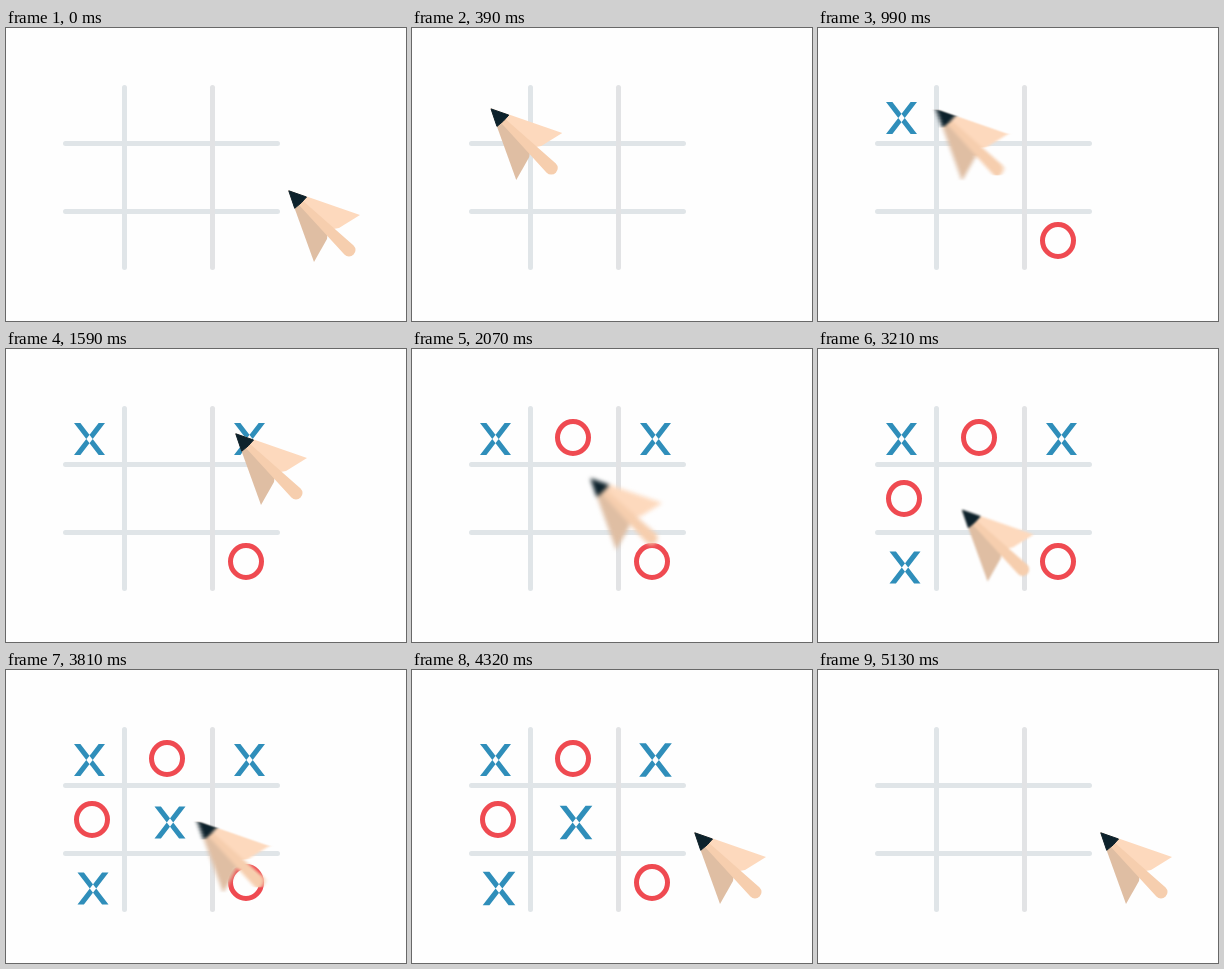
An HTML page for the animation above (5280 ms loop, 400 by 293 pixels).

```html
<!DOCTYPE html>
<html lang="en">
<head>
<meta charset="utf-8">
<title>Noughts and crosses</title>
<style>
html, body { margin: 0; width: 100%; height: 100%; overflow: hidden; background: #fefefe; }
svg { display: block; width: 100vw; height: 100vh; }
.grid { fill: none; stroke: #e0e5e8; stroke-width: 5; stroke-linecap: round; }
.x { fill: #2f8eba; }
.o { fill: none; stroke: #ef4a51; stroke-width: 5; }
</style>
</head>
<body>
<svg viewBox="0 0 400 293">
  <defs>
    <filter id="blur" x="-20%" y="-20%" width="140%" height="140%" color-interpolation-filters="sRGB">
      <feGaussianBlur stdDeviation="0"/>
    </filter>
    <path id="x" class="x" d="M-15.5-16h6.4L15.5 16H9.1zM15.5-16H9.1L-15.5 16h6.4z"/>
    <ellipse id="o" class="o" rx="15.5" ry="16"/>
  </defs>
  <path class="grid" d="M118.5 59.5V239.5M59.5 115.5H271.5M59.5 183.5H271.5"/>
  <path class="grid" style="stroke:#e2e3e5" d="M206.5 59.5V239.5"/>
  <g id="marks"></g>
  <g filter="url(#blur)">
    <g id="pencil">
      <path fill="#fdd9bd" d="M0 0L72 25 51 38 40 40z"/>
      <path fill="#dfbea3" d="M0 0L26 72 39 49 40 40z"/>
      <path fill="#f6ceae" d="M14.5 10.5L65.6 55.4A6.5 6.5 0 0 1 56.4 64.6L10.5 14.5z"/>
      <path fill="#0d222c" stroke="#0d222c" stroke-linejoin="round" d="M.8.8L18.5 7Q14 13 6.7 18.3z"/>
    </g>
  </g>
</svg>
<script>
const LOOP = 5280, HOME = [282, 162];

// start, end, x, y, end of the press that follows
const moves = [
  [0, 400, 78, 80, 700],
  [852, 1256, 229, 84, 1590],
  [1910, 2310, 83.5, 213, 2670],
  [2930, 3330, 159, 147, 3570],
  [3690, 4050, 286, 163],
  [4050, 4230, ...HOME]
];

// shape, x, y, fade start, fade end, part of the winning line
const marks = [
  ['x', 83.5, 90, 510, 630],
  ['o', 240, 212.5, 640, 850],
  ['x', 243.5, 90, 1380, 1500, true],
  ['o', 161, 88.5, 1650, 1910],
  ['x', 87, 218.5, 2435, 2600, true],
  ['o', 86, 149.5, 2820, 3000],
  ['x', 164, 152.5, 3420, 3560, true]
];

const $ = s => document.querySelector(s);
const ramp = (t, a, b) => Math.min(1, Math.max(0, (t - a) / (b - a)));
const ease = p => (1 - Math.cos(Math.PI * p)) / 2;

const layer = $('#marks'), pencil = $('#pencil'), blur = $('feGaussianBlur');
const nodes = marks.map(([shape]) => {
  const node = document.createElementNS('http://www.w3.org/2000/svg', 'use');
  node.setAttribute('href', '#' + shape);
  return layer.appendChild(node);
});

function position(t) {
  let [x, y] = HOME;
  for (const [start, end, toX, toY] of moves) {
    const p = ease(ramp(t, start, end));
    x += (toX - x) * p;
    y += (toY - y) * p;
  }
  return [x, y];
}

function pressScale(t) {
  const move = moves.find(m => t > m[1] && t < m[4]);
  return move ? 1 - 0.08 * Math.sin(Math.PI * ramp(t, move[1], move[4])) : 1;
}

function draw(t) {
  const pulse = 1 + 0.13 * Math.abs(Math.sin(2 * Math.PI * ramp(t, 3930, 4620)));
  marks.forEach(([, x, y, start, end, wins], i) => {
    nodes[i].setAttribute('transform', `translate(${x} ${y}) scale(${wins ? pulse : 1})`);
    nodes[i].setAttribute('opacity', ramp(t, start, end));
  });
  layer.setAttribute('opacity', 1 - ramp(t, 4740, 5130));

  const [x, y] = position(t), [x0, y0] = position(t - 2), [x1, y1] = position(t + 2);
  pencil.setAttribute('transform',
    `translate(${x + 36} ${y + 36}) scale(${pressScale(t)}) translate(-36 -36)`);
  // motion blur follows the speed along each axis
  blur.setAttribute('stdDeviation', `${Math.abs(x1 - x0)} ${Math.abs(y1 - y0)}`);
}

const began = performance.now();
function tick() {
  draw((performance.now() - began) % LOOP);
  requestAnimationFrame(tick);
}
tick();
</script>
</body>
</html>
```
